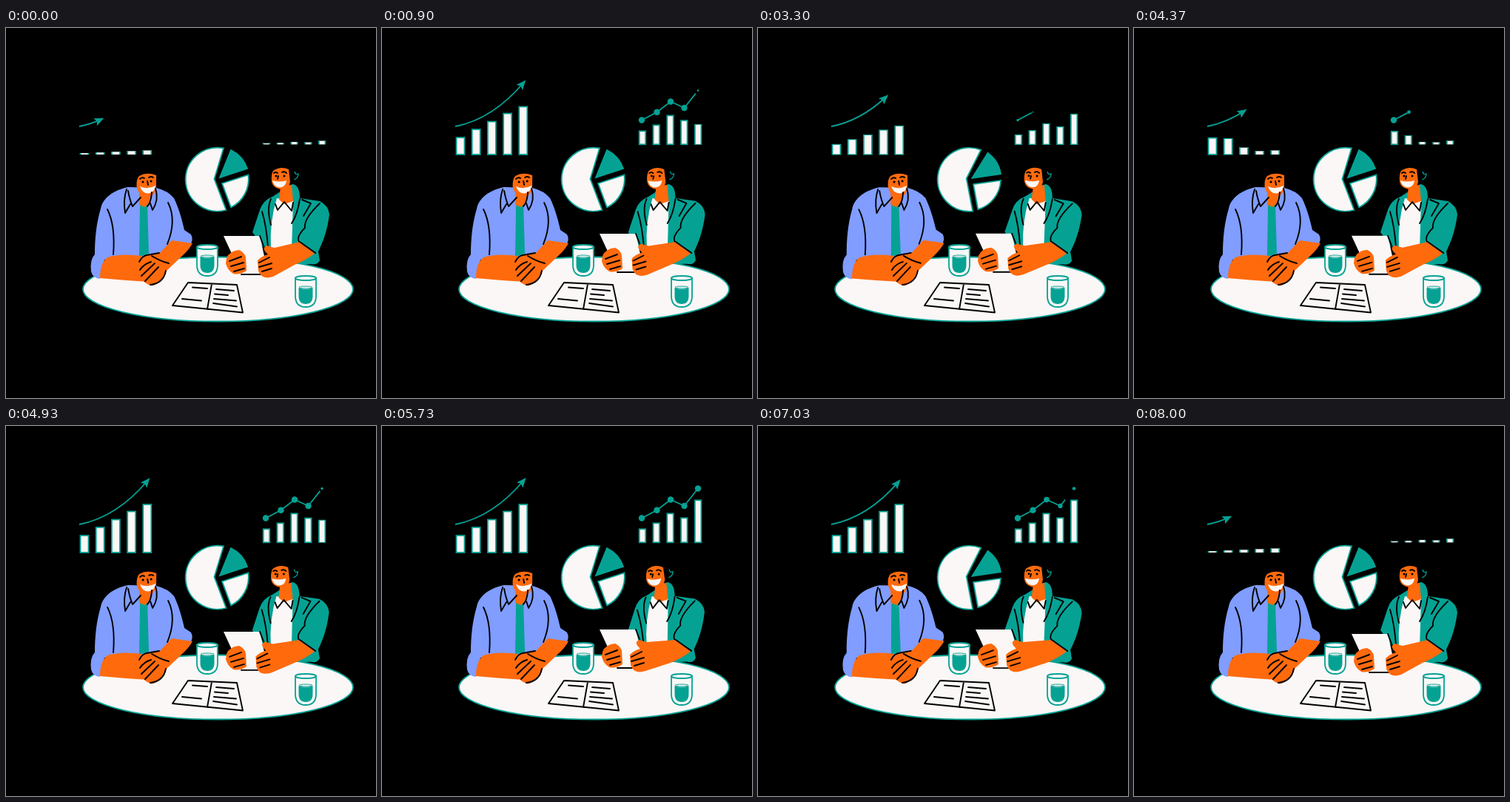
An HTML page for the animation above (8.03 s loop, 500 px wide and 500 px high).

```html
<!DOCTYPE html>
<html lang="en">
<head>
<meta charset="utf-8">
<title>Meeting with charts</title>
<style>
html, body { margin: 0; width: 100%; height: 100%; overflow: hidden; background: #000; }
svg { display: block; width: 100vw; height: 100vh; }
.teal { fill: #05a294; }
.white { fill: #faf7f6; }
.skin { fill: #ff6a0d; }
.blue { fill: #809dff; }
.edge { stroke: #05a294; stroke-width: 1.8; }
.line { fill: none; stroke: #05a294; stroke-width: 1.8; }
.ink { fill: none; stroke: #000; stroke-width: 1.9; stroke-linecap: round; stroke-linejoin: round; }
</style>
</head>
<body>
<svg viewBox="0 0 500 500">
  <defs>
    <g id="glass">
      <path class="white edge" d="M258 296V320Q258 335 272 335Q286 335 286 320V296Z"/>
      <ellipse class="white edge" cx="272" cy="296" rx="14" ry="3"/>
      <path class="teal" d="M262.500 309Q272 313 281.500 309V320Q281.500 331 272 331Q262.500 331 262.500 320Z"/>
      <ellipse class="white edge" cx="272" cy="308.500" rx="9" ry="1.500" style="stroke-width:1"/>
    </g>
  </defs>

  <g id="leftBars"></g>
  <path id="arrowLine" class="line"/>
  <path id="arrowHead" class="teal"/>

  <g id="rightBars"></g>
  <path id="trend" class="line" pathLength="1"/>
  <g id="dots" class="teal"></g>

  <g id="pie" class="edge">
    <path class="white" d="M281.500 204L294 162.500A43 43 0 1 0 297.500 246Z"/>
    <path class="teal" d="M289 202L304 165A43 43 0 0 1 326 190Z"/>
    <path class="white" d="M292 210L327.500 198.500A43 43 0 0 1 304 242.500Z"/>
  </g>

  <ellipse class="white edge" cx="286.500" cy="353" rx="182.500" ry="43.500"/>

  <path class="ink" d="M246 344L312 347L320 384.500L225 375ZM278 346L272 380M252 350.500L272 352M238 366L264 368.500M284 353L308 355M282 359.500L300 361M281 366L311 368.500M280 372L312 376.500"/>

  <g id="man">
    <path class="blue" d="M165 215C146 219 131 229 128 244C122 264 120 285 120 306Q113 313 115 329Q117 338 127 339L133 313L185 312L220 303L226 289L248 295Q254 286 250 279L241 273C237 255 232 240 227 230Q219 220 203 216Z"/>
    <path class="teal" d="M181 238L191 238L193 305L180 309Z"/>
    <path class="skin" d="M180 222L196 222L194 235L188 242L180 239Z"/>
    <path class="skin" d="M180 200Q190 194 203 199L203 212Q203 228 191 228Q179 227 176.500 214Q176 204 180 200Z"/>
    <path class="white" d="M181 214Q191 219 202 213Q201 222 193 223.500Q184 224 181 214Z"/>
    <path class="ink" d="M181 204Q184 201 187 203M193 202Q196 200 199 202M191 207L192 212" stroke-width="1.500"/>
    <circle cx="185" cy="208" r="1.600"/><circle cx="196" cy="207" r="1.600"/>
    <path class="ink" d="M163 218Q158 232 161 250L168 238M165 220Q167 232 171 241L182 229M197 222Q196 236 191 241M202 217Q207 232 198 246L195 237M137 245Q148 267 145 306M219 236Q231 260 218 292"/>
    <path class="skin" d="M127 338Q127 318 137 310Q155 304 184 308L192 343Q160 341 127 338Z"/>
    <path class="skin" d="M224 287L252 291Q247 300 238 308L216 329Q208 347 197 348.500Q184 345 181 333Q181 315 188 307L208 304Z"/>
    <path class="ink" d="M180 316Q184 308 190 307L207 304M181 327Q186 319 196 316M183 335L201 318M188 342L206 323M195 347Q213 345 216 328M197 308Q208 315 220 318"/>
  </g>

  <g id="woman">
    <path class="teal" d="M387 211Q397 212 397 230L424 234Q436 240 437 252C434 275 428 290 422 302L424 314Q421 321 412 319L386 319L350 300L345 292L333 276L343 246Q347 233 360 228Z"/>
    <path class="white" d="M366 230L388 234L386 300L358 297Q356 262 366 230Z"/>
    <path class="skin" d="M371 214L386 212L388 234L376 238L369 232Z"/>
    <path class="skin" d="M361 193Q371 186 382 191L384 208Q382 219 373 218Q361 217 359 208Q358 198 361 193Z"/>
    <path class="white" d="M360 206Q369 209 379 206Q378 215 370 215.500Q362 215 360 206Z"/>
    <path class="ink" d="M362 196Q364 194 367 196M373 195Q376 193 379 196M368 200L367 204" stroke-width="1.500"/>
    <circle cx="365" cy="200" r="1.500"/><circle cx="376" cy="200" r="1.500"/>
    <path class="line" d="M390 194Q391 199 395 197Q395 203 389 205" style="stroke-width:1.300"/>
    <path class="ink" d="M364 238L367 246L376 235L386 247L388 236M397 231Q394 252 386 264M358 231Q352 244 358 266M346 248Q352 268 354 296M400 232L412 237L402 254M424 237Q402 258 404 270Q392 282 396 289L418 304"/>
  </g>

  <g id="sheet">
    <path class="white" d="M294 281L343 281L354 331L318 333Z"/>
    <path class="ink" d="M343 281L354 310M318 333L350 333"/>
    <path class="skin" d="M298 311Q302 301 315 300Q322 303 324 310L325 328Q316 334 307 332Q299 327 297 318Z"/>
    <path class="ink" d="M302 315L318 309M304 322L321 317M308 329L322 325"/>
  </g>
  <path id="arm" class="skin"/>
  <path id="fingers" class="ink"/>

  <use href="#glass"/>
  <use href="#glass" x="133" y="42"/>
</svg>

<script>
const LOOP = 8030, CYCLE = LOOP / 2, LOW = 0.085;
const $ = id => document.getElementById(id);
const ease = x => 0.5 - 0.5 * Math.cos(Math.PI * Math.min(1, Math.max(0, x)));
const ramp = (t, start, length) => ease((t - start) / length);
const mix = (a, b, k) => a + (b - a) * k;

function add(parent, tag, attrs) {
  const el = document.createElementNS('http://www.w3.org/2000/svg', tag);
  for (const name in attrs) el.setAttribute(name, attrs[name]);
  return parent.appendChild(el);
}

// Eased value between [time, value] stops.
function track(t, stops) {
  for (let i = 1; i < stops.length; i++) {
    const [t0, a] = stops[i - 1], [t1, b] = stops[i];
    if (t <= t1) return mix(a, b, ease((t - t0) / (t1 - t0)));
  }
  return stops[stops.length - 1][1];
}

function makeBars(id, x0, gap, width, base, heights) {
  return heights.map((h, i) => ({
    base,
    el: add($(id), 'rect', { class: 'white edge', x: x0 + gap * i, y: base - h, width, height: h })
  }));
}

const leftBars = makeBars('leftBars', 100.5, 21.2, 11, 171, [23, 34, 44.5, 55.5, 65]);
const rightBars = makeBars('rightBars', 347.7, 18.8, 8.5, 157.3, [18, 26, 39, 33, 57]);
const points = [[351, 124.5], [371.5, 113.7], [390, 99.5], [408.5, 108], [427, 84.5]];
const dots = points.map(([cx, cy]) => add($('dots'), 'circle', { cx, cy }));
$('trend').setAttribute('d', 'M' + points.join('L'));

function drawBars(bars, t, delay, shrinkTime) {
  const shrink = ramp(t, 3000, shrinkTime);
  bars.forEach(({ el, base }, i) => {
    const k = mix(LOW, 1, ramp(t, i * delay, 400) * (1 - shrink));
    el.setAttribute('transform', `translate(0 ${base * (1 - k)}) scale(1 ${k})`);
  });
}

function drawArrow(t) {
  const s = mix(0.3, 1, ramp(t, 0, 950) * (1 - ramp(t, 2885, 1100)));
  const a = [99, 133], b = [150, 123], c = [192, 73];
  const mid = [0, 1].map(i => mix(a[i], b[i], s));
  const next = [0, 1].map(i => mix(b[i], c[i], s));
  const end = [0, 1].map(i => mix(mid[i], next[i], s));
  const angle = Math.atan2(next[1] - mid[1], next[0] - mid[0]) * 180 / Math.PI;
  $('arrowLine').setAttribute('d', `M${a}Q${mid} ${end}`);
  $('arrowHead').setAttribute('d', 'M4 0L-9 -5.500L-6.500 0L-9 5.500Z');
  $('arrowHead').setAttribute('transform', `translate(${end}) rotate(${angle})`);
}

function drawTrend(t) {
  const s = ramp(t, 50, 1000) * (1 - ramp(t, 2805, 720));
  $('trend').setAttribute('stroke-dasharray', `${s} 2`);
  $('trend').style.visibility = s > 0.002 ? 'visible' : 'hidden';
  dots.forEach((dot, i) => {
    const k = ramp(t, 30 + i * 195, 240) * (1 - ramp(t, 2805 + (4 - i) * 60, 450));
    dot.setAttribute('r', 4.2 * k);
  });
}

function drawPeople(t) {
  const manTilt = track(t, [[0, 0], [1650, 0.1], [2000, -0.5], [3300, -0.4], [3950, 0]]);
  const womanTilt = track(t, [[0, 0], [350, 0], [1700, -0.9], [2000, -0.9], [3050, 0.5], [3350, 0.5], [4000, 0]]);
  $('man').setAttribute('transform', `rotate(${manTilt} 185 340)`);
  $('woman').setAttribute('transform', `rotate(${womanTilt} 385 320)`);

  const lift = track(t, [[0, 0], [200, 0], [1600, 1], [2950, 1], [3700, 0]]);
  $('sheet').setAttribute('transform', `translate(0 ${-6 * lift})`);
  const p = (x, y) => `${x - 5 * lift} ${y - 5 * lift}`;
  $('arm').setAttribute('d',
    `M397 289L418 304Q405 314 390 320L${p(361, 336)}Q${p(345, 341)} ${p(341, 328)}` +
    `L${p(340, 314)}Q${p(346, 308)} ${p(354, 306)}Q${p(344, 297)} ${p(353, 294)}Q${p(358, 296)} ${p(363, 297)}Z`);
  $('fingers').setAttribute('d',
    `M${p(342, 317)}L${p(356, 310)}M${p(342, 323)}L${p(359, 318)}M${p(346, 329)}L${p(359, 325)}M397 289L418 304`);
}

function draw(time) {
  const t = time % LOOP % CYCLE;
  drawBars(leftBars, t, 130, 650);
  drawBars(rightBars, t, 180, 800);
  drawArrow(t);
  drawTrend(t);
  drawPeople(t);
  const turn = track(t, [[0, 0], [2050, 0], [2950, 10], [3300, 10], [3950, 0]]);
  $('pie').setAttribute('transform', `rotate(${turn} 285 205)`);
}

const start = performance.now();
function tick() {
  draw(performance.now() - start);
  requestAnimationFrame(tick);
}
tick();
</script>
</body>
</html>
```
